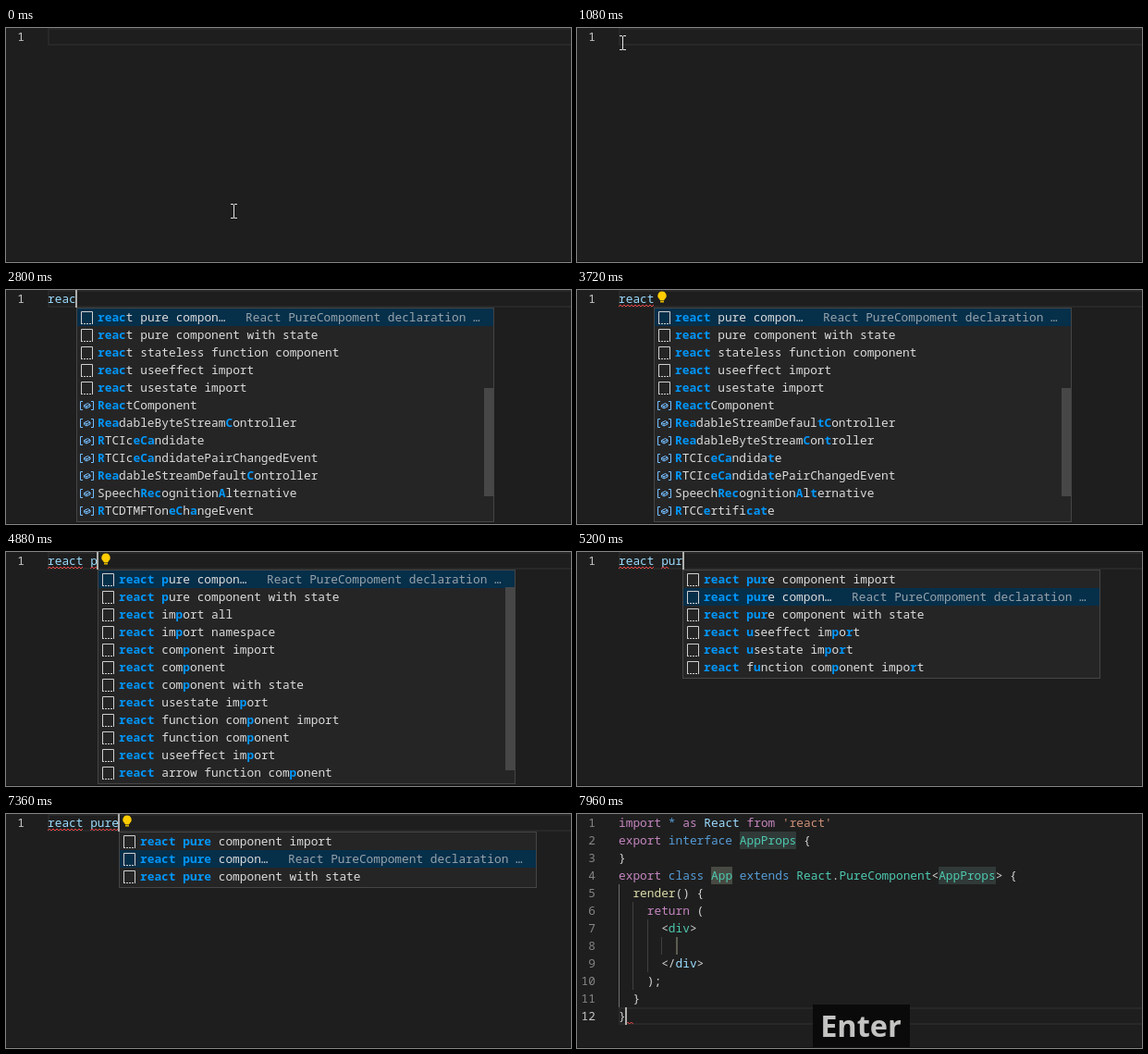
Recreate the animation shown at these times as an HTML page. Size 611 px wide and 253 px high, loop 8 s.

```html
<!DOCTYPE html>
<html lang="en">
<head>
<meta charset="utf-8">
<title>Snippet completion</title>
<style>
html, body { margin: 0; width: 100%; height: 100%; overflow: hidden; background: #1e1e1e; }
#stage {
  position: relative; width: 611px; height: 253px; overflow: hidden;
  background: #1e1e1e; color: #d4d4d4;
  font: 500 12.828px/18px "Noto Sans Mono", "DejaVu Sans Mono", monospace;
  font-variant-ligatures: none; white-space: pre;
}
:where(#stage) :where(div, svg) { position: absolute; top: 0; left: 0; }
#stage .hidden { display: none; }
#lineBox { left: 45px; right: -2px; height: 15px; border: 2px solid #282828; }
.num { width: 20px; text-align: right; color: #858585; }
.num.on { color: #c6c6c6; }
.line { left: 45px; height: 19px; }
#typed { color: #9cdcfe; }
#caret { width: 2px; height: 19px; background: #aeafad; }
#squiggle, #mouse, #bulb { overflow: visible; }
.guide { width: 1px; background: #404040; }
.spot { height: 19px; background: #303a38; }
#popup { top: 19px; width: 450px; border: 1px solid #454545; background: #252526; }
.row { width: 450px; height: 19px; }
.row.sel { background: #062f4a; }
.row svg { left: 3px; top: 2px; }
.row .label { left: 22px; color: #dcdcdc; }
.row b { color: #0097fb; font-weight: 600; }
.row .detail { opacity: .7; }
.row .path { left: 73px; font-size: 11.53px; opacity: .4; }
#thumb { left: 440px; width: 10px; background: #474748; }
#key {
  left: 255px; top: 206px; width: 105px; height: 47px; background: #0a0a0a; color: #c3c4c2;
  font: bold 32.5px/46px "Open Sans", "Noto Sans", sans-serif; text-align: center; text-indent: -1px;
}
#edge { top: 252px; width: 611px; height: 1px; background: #121212; }
.p { color: #c586c0; } .b { color: #569cd6; } .t { color: #4ec9b0; }
.v { color: #9cdcfe; } .s { color: #ce9178; } .f { color: #dcdcaa; }
</style>
</head>
<body>
<div id="stage">
  <div id="lineBox"></div>
  <div id="spots"></div>
  <div id="lines"></div>
  <div id="typed" class="line"></div>
  <svg id="squiggle" width="611" height="253"><path fill="none" stroke="#f44747"/></svg>
  <div id="caret"></div>
  <svg id="bulb" width="12" height="16">
    <path d="M6 1.5a4.700 4.700 0 0 1 2.600 8.600V11H3.400v-.9A4.700 4.700 0 0 1 6 1.500z" fill="#fc0"/>
    <path d="M4 12.5h4" stroke="#e0b400" stroke-width="2"/>
  </svg>
  <div id="popup"></div>
  <svg id="mouse" width="8" height="17">
    <path d="M0 .5h3m1 0h3M3.5 1v14.500M0 15.500h3m1 0h3" fill="none" stroke="#e4e4e4"/>
  </svg>
  <div id="key">Enter</div>
  <div id="edge"></div>
</div>
<script>
const $ = id => document.getElementById(id);
const LOOP = 8000, LEFT = 45, CHAR = 7.697, LINE = 19;
const colX = n => LEFT + CHAR * n;
const box = (cls, x, y, w, h, extra = '') =>
  `<div class="${cls}" style="left:${x}px;top:${y}px;width:${w}px;height:${h}px;${extra}"></div>`;

const icons = {
  snippet: `<path d="M1.5 14V1.5h12V14" stroke="#d0d0d0"/><path d="M1 14.5h13" stroke="#d0d0d0" stroke-dasharray="2 1"/>`,
  method: `<path d="M8 1.5l5.5 3v6.5l-5.5 3.5l-5.5-3.5V4.5zM2.5 4.5l5.5 3l5.5-3M8 7.5v7" stroke="#b180d7"/>`,
  variable: `<path d="M3 3.5H.5v9H3M12 3.5h2.5v9H12M4.5 7.5l4-2l2.5 1.5v2l-4 2l-2.5-1.5zM4.5 7.5l2.5 1.3l4-1.8M7 9v2" stroke="#75beff"/>`
};

const pure = ['react pure compon…', 'react pure component with state'];
const hooks = ['react useeffect import', 'react usestate import'];
const basics = [...pure, 'react stateless function component', ...hooks];
const ref = 'ref', pairEvent = '{R}TCIc{eCa}ndidatePairChangedEvent';
const byteStream = 'ReadableByteStreamController', defStream = 'ReadableStreamDefaultController';
const pureImport = 'react pure component import';
const funcImport = 'react function component import';
const funcs = ['react function component', 'react arrow function component'];
const reactAll = [...pure, 'react import all', 'react import namespace', 'react component import',
  'react component', 'react component with state', hooks[1], funcImport, funcs[0], hooks[0], funcs[1]];

// Suggestions by typed text: rows, selected row, scrollbar thumb top and height
const lists = {
  'r': { rows: [...basics, 'rfc', 'rpc', 'rpcs', 'rsfc', ref, 'render', 'RTCCertificate'], thumb: [29, 20] },
  're': { rows: [...basics, ref, 'render', 'ReactComponent', 'ReadableStream', 'RegExp', 'Request', 'Response'], thumb: [44, 26] },
  'rea': { rows: [...basics, 'ReactComponent', 'ReadableStream', byteStream, defStream,
    'ReadableStreamDefaultReader', 'RTCIceCandidate', 'SpeechRecognitionAlternative'], thumb: [70, 70] },
  'reac': { rows: [...basics, 'ReactComponent', byteStream, 'RTCIceCandidate', pairEvent, defStream,
    'SpeechRecognitionAlternative', 'RTCDTMFToneChangeEvent'], thumb: [86, 117] },
  'react': { rows: [...basics, 'ReactComponent', '{Rea}dableStreamDefaul{tC}ontroller', byteStream, 'RTCIceCandidate',
    '{R}TCIc{eCa}ndida{t}ePairChangedEvent', 'SpeechRecognitionAlternative', 'RTCCertificate'], thumb: [86, 117] },
  'react ': { rows: reactAll, thumb: [18, 190] },
  'react p': { rows: reactAll, thumb: [18, 198] },
  'react pu': { rows: [...pure, pureImport, ...hooks, funcImport, ...funcs, basics[2]] },
  'react pur': { rows: [pureImport, ...pure, ...hooks, funcImport], sel: 1 },
  'react pure': { rows: [pureImport, ...pure], sel: 1 }
};

const code = [
  "[p import] [b *] [p as] [v React] [p from] [s 'react']",
  '[p export] [b interface] [t AppProps] {',
  '}',
  '[p export] [b class] [t App] [b extends] [t React].[t PureComponent]&lt;[t AppProps]> {',
  '  [f render]() {',
  '    [p return] (',
  '      &lt;[t div]>',
  '',
  '      &lt;/[v div]>',
  '    );',
  '  }',
  '}'
];

// Each entry changes part of the state from its time on
const steps = [
  [0, { text: '', pop: '', caret: 0, wave: 0, bulb: 0, code: 0 }],
  [320, { caret: 1 }], [840, { caret: 0 }], [1320, { caret: 1 }], [1840, { caret: 0 }],
  [1920, { text: 'r', caret: 1 }], [2080, { pop: 'r' }],
  [2160, { text: 're', pop: 're' }],
  [2400, { text: 'rea' }], [2480, { pop: 'rea' }],
  [2720, { text: 'reac' }], [2800, { pop: 'reac' }], [2840, { wave: 4 }],
  [3080, { text: 'react' }], [3160, { pop: 'react' }],
  [3560, { wave: 5, bulb: 1 }], [3720, { caret: 0 }],
  [4040, { text: 'react ', pop: 'react ', caret: 1, bulb: 0 }],
  [4480, { text: 'react p' }], [4560, { pop: 'react p' }],
  [4720, { bulb: 1 }], [4880, { wave: 7 }],
  [4960, { text: 'react pu', pop: 'react pu', bulb: 0 }],
  [5200, { text: 'react pur', pop: 'react pur' }],
  [5400, { text: 'react pure', pop: 'react pure' }],
  [5640, { wave: 10 }], [5720, { bulb: 1 }],
  [5880, { caret: 0 }], [6360, { caret: 1 }], [6880, { caret: 0 }], [7360, { caret: 1 }],
  [7800, { text: '', pop: '', bulb: 0, wave: 0, caret: 1, code: 1 }],
  [7880, { code: 2 }], [7960, { code: 3 }]
];

function subsequence(label, query) {
  const hits = new Set(), low = label.toLowerCase();
  let at = -1;
  for (const c of query) {
    at = low.indexOf(c, at + 1);
    if (at < 0) return null;
    hits.add(at);
  }
  return hits;
}

// Fuzzy match that also accepts two neighbouring letters swapped
function mark(label, query) {
  if (label.includes('{')) return label.replace(/{/g, '<b>').replace(/}/g, '</b>');
  let hits = subsequence(label, query);
  for (let i = 0; !hits && i < query.length - 1; i++)
    hits = subsequence(label, query.slice(0, i) + query[i + 1] + query[i] + query.slice(i + 2));
  return [...label].map((c, i) => hits && hits.has(i) ? `<b>${c}</b>` : c).join('');
}

function rowHtml(label, i, query, sel) {
  const kind = label === 'render' ? 'method' : /^[{A-Z]/.test(label) ? 'variable' : 'snippet';
  let detail = '';
  if (label === pure[0]) detail = '<div class="detail" style="left:182px">React PureCompoment declaration …</div>';
  if (label === ref) detail = '<div class="detail" style="left:271px">Triple-slash reference</div>';
  if (label === 'render') detail = '<div class="path">node_modules/@testing-library/react/types/index</div>';
  return `<div class="row${i === sel ? ' sel' : ''}" style="top:${i * LINE}px">` +
    `<svg width="16" height="16" fill="none">${icons[kind]}</svg>` +
    `<div class="label">${mark(label, query)}</div>${detail}</div>`;
}

function drawPopup(query) {
  const list = lists[query], el = $('popup');
  el.classList.toggle('hidden', !list);
  if (!list) return;
  const { rows, sel = 0, thumb } = list;
  el.style.left = Math.round(colX(query.length)) + 'px';
  el.style.height = rows.length * LINE + 2 + 'px';
  el.innerHTML = rows.map((r, i) => rowHtml(r, i, query, sel)).join('') +
    (thumb ? `<div id="thumb" style="top:${thumb[0]}px;height:${thumb[1]}px"></div>` : '');
}

function wave(col, len, row) {
  const n = Math.round(len * CHAR / 2);
  let d = `M${colX(col)} ${row * LINE + 18}`;
  for (let i = 0; i < n; i++) d += `l2 ${i % 2 ? 2 : -2}`;
  return d;
}

function drawLines(stage) {
  const last = stage ? code.length - 1 : 0;
  const shown = stage ? code : [''];
  $('lines').innerHTML = shown.map((s, i) => {
    const y = i * LINE;
    const html = s.replace(/\[(\w) ([^\]]*)\]/g, '<span class="$1">$2</span>');
    return `<div class="num${i === last ? ' on' : ''}" style="top:${y}px">${i + 1}</div>` +
      `<div class="line" style="top:${y}px">${html}</div>`;
  }).join('');
  const spot = (col, row, len, color = '') =>
    box('spot', colX(col), row * LINE, len * CHAR, LINE, color && `background:${color}`);
  const guide = (col, from, to, color = '') =>
    box('guide', Math.round(colX(col)), from * LINE, 1, (to - from) * LINE, color && `background:${color}`);
  const guides = guide(0, 4, 11, '#707070') + guide(2, 5, 10) + guide(4, 6, 9) + guide(6, 7, 8);
  const spots = spot(17, 1, 8) + spot(13, 3, 3, '#464a42') + spot(45, 3, 8) +
    box('', 107, 7 * LINE, 2, LINE, 'background:#5c5c50');
  $('spots').innerHTML = (stage ? guides : '') + (stage > 1 ? spots : '');
  $('lineBox').style.top = last * LINE + 'px';
}

function draw(s) {
  $('typed').textContent = s.text;
  drawLines(s.code);
  drawPopup(s.pop);
  const caret = $('caret');
  caret.classList.toggle('hidden', !s.caret);
  caret.style.left = Math.floor(colX(s.code ? 1 : s.text.length)) + 'px';
  caret.style.top = (s.code ? 11 * LINE : 0) + 'px';
  let d = s.wave ? wave(0, Math.min(s.wave, 5), 0) : '';
  if (s.wave > 6) d += wave(6, s.wave - 6, 0);
  if (s.code > 2) d += wave(1, 1, 11);
  $('squiggle').firstChild.setAttribute('d', d);
  const bulb = $('bulb');
  bulb.classList.toggle('hidden', !s.bulb);
  bulb.style.left = Math.round(colX(s.text.length)) + 2.5 + 'px';
  $('key').classList.toggle('hidden', !s.code);
}

const path = [[0, 246, 198], [760, 26, 12], [840, 33, 14], [920, 49, 16], [1080, 45, 27], [1160, 45, 27]];
function drawMouse(t) {
  const mouse = $('mouse');
  mouse.classList.toggle('hidden', t >= 1160);
  if (t >= 1160) return;
  const now = Math.floor(t / 80) * 80;
  const i = path.findIndex((p, k) => k + 1 < path.length && now < path[k + 1][0]);
  const [t0, x0, y0] = path[i], [t1, x1, y1] = path[i + 1];
  let u = (now - t0) / (t1 - t0);
  u = i > 2 ? 0 : u * u * (3 - 2 * u);
  const x = Math.round(x0 + (x1 - x0) * u), y = Math.round(y0 + (y1 - y0) * u);
  mouse.style.transform = `translate(${x - 3}px,${y - 8}px)`;
}

const start = performance.now();
let shown = -1;
function tick() {
  const t = Math.max(0, performance.now() - start) % LOOP;
  let n = 0;
  while (n < steps.length && steps[n][0] <= t) n++;
  if (n !== shown) {
    shown = n;
    draw(Object.assign({}, ...steps.slice(0, n).map(s => s[1])));
  }
  drawMouse(t);
  requestAnimationFrame(tick);
}
tick();
</script>
</body>
</html>
```
